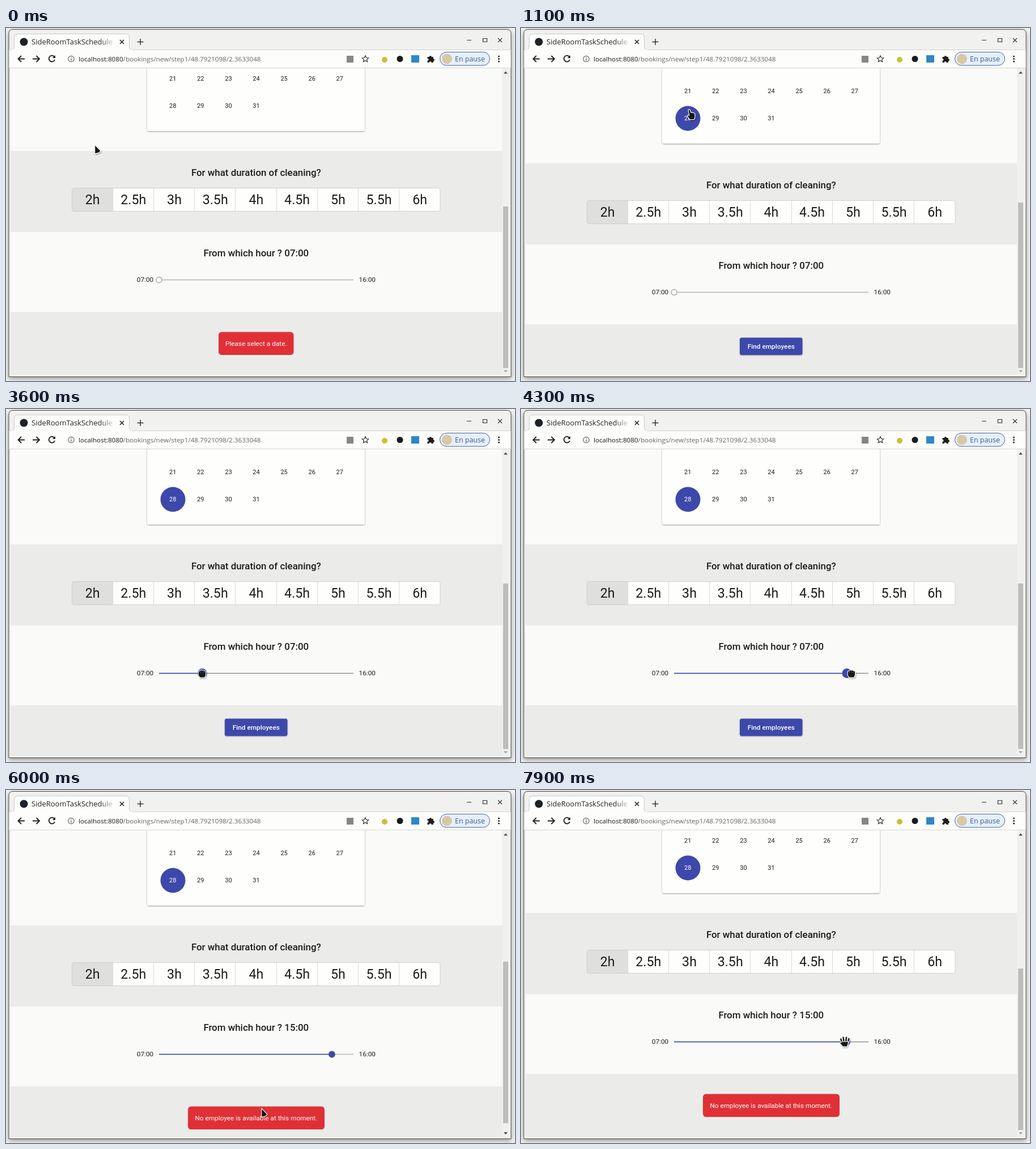
An HTML page that plays this animation: 898 px wide and 623 px high, repeating every 8 s.

```html
<!DOCTYPE html>
<html lang="en">
<head>
<meta charset="utf-8">
<title>Booking form</title>
<style>
  html, body { margin: 0; width: 100%; height: 100%; overflow: hidden; background: #f4f4f2; }
  svg { display: block; width: 898px; height: 623px; }
  text { font-family: Roboto, sans-serif; fill: #1c1c1c; }
  .ui { font-family: "Open Sans", "Noto Sans", sans-serif; }
  .line { fill: none; stroke: #333; stroke-width: 1.2; }
  .bold { fill: none; stroke: #222; stroke-width: 1.9; }
</style>
</head>
<body>
<svg id="stage" viewBox="0 0 898 623" xmlns="http://www.w3.org/2000/svg"></svg>
<script>
const LOOP = 8000, STEP = 100;
const BLUE = '#3d49aa', RED = '#e03036', GREY = '#ebece9', PAPER = '#fafbf8', CARD = '#fefffc';
const TRACK = { left: 270, right: 613, y: 444.5, hours: 9 };

const rect = (x, y, w, h, fill, extra = '') =>
  `<rect x="${x}" y="${y}" width="${w}" height="${h}" fill="${fill}" ${extra}/>`;
const circle = (x, y, r, fill, extra = '') =>
  `<circle cx="${x}" cy="${y}" r="${r}" fill="${fill}" ${extra}/>`;
const path = (d, extra = 'class="line"') => `<path d="${d}" ${extra}/>`;
// Text placed by the middle of its capitals.
const label = (str, x, mid, size, extra = '') =>
  `<text x="${x}" y="${mid + size * 0.356}" font-size="${size}" text-anchor="middle" ${extra}>${str}</text>`;
const uiText = (str, x, y, size, fill) =>
  `<text class="ui" x="${x}" y="${y}" font-size="${size}" style="fill:${fill}">${str}</text>`;
const group = (id, body) => `<g id="${id}">${body}</g>`;

function defs() {
  return `<defs>
    <clipPath id="page-clip"><rect x="8" y="71" width="867" height="541"/></clipPath>
    <linearGradient id="fade"><stop offset="0" stop-color="#fdfdfb" stop-opacity="0"/>
      <stop offset="1" stop-color="#fdfdfb"/></linearGradient>
    <filter id="window-shadow" x="-5%" y="-5%" width="110%" height="110%">
      <feDropShadow dx="0" dy="3" stdDeviation="4" flood-opacity=".4"/></filter>
    <filter id="card-shadow" x="-5%" y="-5%" width="110%" height="110%">
      <feDropShadow dx="0" dy="1" stdDeviation="1" flood-opacity=".4"/></filter>
    <filter id="cursor-shadow" x="-50%" y="-50%" width="200%" height="200%">
      <feDropShadow dx="1" dy="1.5" stdDeviation="1" flood-opacity=".35"/></filter>
  </defs>`;
}

function browser() {
  return [
    path('M5 615.5V10Q5 2.5 12 2.5H884Q891 2.5 891 10V615.5Z',
      'fill="#f1f2ef" stroke="#4c4c4a" filter="url(#window-shadow)"'),
    rect(5.5, 38, 885, 33, '#fdfdfb'),
    path('M5.5 38.5H890.5', 'stroke="#d2d3d0" fill="none"'),
    path('M8 39Q14.500 39 14.500 32V17Q14.500 10.500 21 10.500H211Q217.500 10.500 217.500 17V32Q217.500 39 224 39',
      'fill="#fdfdfb" stroke="#c9cac7"'),
    rect(9, 38, 214, 2, '#fdfdfb'),
    circle(31.500, 24.500, 7, '#1d2226'),
    uiText('SideRoomTaskSchedule', 45, 29, 13, '#222'),
    rect(166, 13, 27, 23, 'url(#fade)'), rect(192.500, 13, 8, 23, '#fdfdfb'),
    path('M201 21l7 7m0-7l-7 7', 'class="bold" style="stroke-width:1.6"'),
    path('M231.500 24.500h11m-5.500-5.500v11', 'class="line" style="stroke-width:1.5"'),
    path('M813 21.500h8M841.500 18.500h7v6h-7zM868 18l7 7m0-7l-7 7'),
    path('M33 54.500H21.500m5.500-5.500l-5.500 5.500 5.500 5.500M47 54.500h12m-5.500-5.500l5.500 5.500-5.500 5.500', 'class="bold"'),
    path('M85.500 51a5.400 5.400 0 1 0 .6 5', 'class="bold"'),
    path('M87 48v5h-5z', 'fill="#222"'),
    circle(115, 54.500, 5.200, 'none', 'stroke="#666" stroke-width="1.2"'),
    path('M115 53.800v4M115 51v1.500', 'stroke="#666" stroke-width="1.3"'),
    uiText('localhost:8080<tspan fill="#666">/bookings/new/step1/48.7921098/2.3633048</tspan>', 128, 58.500, 11.660, null),
    rect(601, 49, 12, 12, '#858785'),
    path('M634 48.800l1.700 3.700 4 .4-3 2.700.9 4-3.600-2.100-3.600 2.100.9-4-3-2.700 4-.4z'),
    circle(668, 56, 5, '#c6c13b'), circle(695, 54.500, 5.500, '#1a1a1a'), rect(715, 48, 14, 13, '#2f86c9'),
    path('M743.500 51h3.300a2 2 0 1 1 4 0h3v3.300a2.100 2.100 0 1 1 0 4.200v2.500h-3.200a2 2 0 0 0-4 0h-3.100v-3.300a2 2 0 0 0 0-4z', 'fill="#1d1d1d"'),
    rect(765.500, 42.500, 88, 23.500, '#e8eff9', 'rx="11.750" stroke="#3d629c"'),
    circle(778, 54.500, 9, '#d8c8a6'),
    uiText('En pause', 792, 59, 12.450, '#315f9f'),
    circle(869.500, 50, 1.500, '#222'), circle(869.500, 54.500, 1.500, '#222'), circle(869.500, 59, 1.500, '#222'),
    path('M5.500 70.500H890.500', 'stroke="#d5d6d3"'),
    rect(8, 71, 867, 541, PAPER),
    rect(875, 71, 12.500, 541, '#f0f1ee'),
    path('M878 80.500l3.500-4 3.500 4z', 'fill="#4c4c4a"'),
    path('M878 604l3.500 4 3.500-4z', 'id="down"'),
    rect(877, 0, 9, 0, '#bdbebb', 'id="bar"')
  ].join('');
}

function calendar() {
  let days = '';
  for (let day = 21; day <= 31; day++) {
    const i = day - 21;
    days += label(day, 294.200 + 49.100 * (i % 7), i < 7 ? 89 : 137, 11, day === 28 ? 'id="picked"' : '');
  }
  return rect(249, 20, 384, 162, CARD, 'rx="3.500" filter="url(#card-shadow)"') +
    circle(294.500, 137.500, 22, 'none', 'id="disc"') + days;
}

function durations() {
  const names = ['2', '2.5', '3', '3.5', '4', '4.5', '5', '5.5', '6'];
  const width = 72.200, left = 116.500;
  let out = rect(left, 282.500, 649.500, 41, CARD, 'rx="3.500"') +
    path('M120 282.500H188.700V323.500H120Q116.500 323.500 116.500 320V286Q116.500 282.500 120 282.500', 'fill="#dfe0dd"');
  names.forEach((name, i) => {
    if (i) out += path(`M${Math.round(left + width * i) - 0.5} 283V323`, 'stroke="#d9dad7"');
    out += label(name + 'h', left + width * (i + 0.5), 302.800, 23.200);
  });
  return out + rect(left, 282.500, 649.500, 41, 'none', 'rx="3.500" stroke="#cfd0cd"');
}

function slider() {
  const { left, right, y } = TRACK;
  return label('07:00', 245.500, 444, 11.830) + label('16:00', 637.300, 444, 11.830) +
    rect(left, y - 0.850, right - left, 1.700, '#000', 'id="rail"') +
    rect(left, y - 0.850, 0, 1.700, BLUE, 'id="fill"') + circle(left, y, 6, BLUE, 'id="thumb"');
}

const notice = (str, x, width) =>
  rect(x, 536.500, width, 40.500, RED, 'rx="5.500"') + label(str, 441.300, 557, 11.830, 'style="fill:#fff"');

function page() {
  return `<g clip-path="url(#page-clip)"><g id="page">` +
    calendar() +
    rect(8, 217, 867, 143, GREY) + rect(8, 501, 867, 170, GREY) +
    label('For what duration of cleaning?', 441.300, 254.800, 16.900, 'font-weight="500"') +
    durations() +
    label('', 441.300, 397.300, 16.900, 'font-weight="500" id="hour"') +
    slider() +
    group('ask', notice('Please select a date.', 375, 132.500)) +
    group('none', notice('No employee is available at this moment.', 321, 241)) +
    group('find', rect(386, 524.500, 110.500, 30.500, BLUE, 'rx="3.400" filter="url(#card-shadow)"') +
      label('Find employees', 441.300, 540, 11.830, 'font-weight="500" style="fill:#fff"')) +
    '</g></g>';
}

function cursors() {
  const ink = 'fill="#161616" stroke="#fff" stroke-width="1.100" stroke-linejoin="round"';
  const finger = (x, top, tilt) => rect(x, top, 3.400, 10, '#161616',
    `rx="1.700" stroke="#fff" stroke-width=".9" transform="rotate(${tilt} ${x + 1.700} 3)"`);
  return `<g id="cursor" filter="url(#cursor-shadow)">` +
    group('arrow', path('M-.3-.8L10 9.800Q8 14 -.3 14.800Z', ink)) +
    group('hand', path('M-3 .8Q-1.500-1.500 .3 .7L2.200 5.500Q5 4 6 6Q8.500 5.500 8.700 7.500L9 13 7.500 17.500H-.5L-4 12Q-5.500 9.500-2.800 9.500L-1.200 10.500Z', ink)) +
    group('open', finger(-6, -6.500, -18) + finger(-3, -9, -6) + finger(0.400, -9, 5) + finger(3.600, -7, 16) +
      path('M-5.500 0H6.500L6 5 4 9H-3L-8 3.500Q-9 1-6.500 1.500Z', ink)) +
    group('closed', path('M-6.500-3Q-5.500-6-3.500-5Q-2-7.500 0-5.800Q2.500-7 3.500-5Q6.500-5.500 6.700-2.500L6.500 3 4.500 7H-4L-7 2.500Z', ink) +
      path('M-3.300-4.500v4M0-5v4.500M3.400-4.500v4', 'stroke="#777" stroke-width=".6"')) +
    '</g>';
}

const stage = document.getElementById('stage');
stage.innerHTML = defs() + browser() + page() + cursors();
const $ = id => document.getElementById(id);
const set = (id, attrs) => Object.entries(attrs).forEach(([key, value]) => $(id).setAttribute(key, value));
const show = (id, on) => set(id, { display: on ? 'inline' : 'none' });

// time, x, y, pointer shape
const route = [
  [0, 157, 207, 'arrow'], [100, 185, 200, 'arrow'], [200, 185, 200, 'arrow'],
  [700, 284, 152, 'hand'], [800, 298, 144, 'hand'], [1300, 298, 144, 'hand'],
  [1600, 276, 195, 'arrow'], [2000, 212, 333, 'hand'], [2200, 207, 317, 'hand'], [2300, 207, 317, 'hand'],
  [2500, 225, 365, 'arrow'], [2700, 260, 452, 'arrow'], [2800, 272, 466, 'open'], [2900, 272, 466, 'open'],
  [3000, 273, 467, 'closed'], [3300, 273, 467, 'closed'], [3600, 346, 467, 'closed'],
  [3800, 537, 467, 'closed'], [4000, 537, 467, 'closed'], [4300, 583, 467, 'closed'], [4400, 583, 467, 'closed'],
  [4500, 578, 470, 'open'], [4600, 524, 506, 'arrow'], [4700, 524, 506, 'arrow'],
  [5000, 456, 556, 'hand'], [5100, 451, 565, 'hand'], [5500, 451, 565, 'hand'],
  [5600, 451, 562.500, 'arrow'], [7100, 451, 562.500, 'arrow'], [7600, 561, 464, 'arrow'],
  [7700, 570, 451, 'open'], [7800, 570, 451, 'open'], [7900, 571, 444, 'open']
];

const mix = (a, b, p) => a + (b - a) * p;
const clamp = (v, low, high) => Math.min(high, Math.max(low, v));

function pointerAt(t) {
  const i = route.findLastIndex(stop => stop[0] <= t);
  const from = route[i], to = route[i + 1] || from;
  const p = to === from ? 0 : (t - from[0]) / (to[0] - from[0]);
  return { x: mix(from[1], to[1], p), y: mix(from[2], to[2], p), shape: from[3] };
}

function hoursAt(t, x) {
  if (t < 3000) return 0;
  if (t >= 4500) return 8;
  const step = (TRACK.right - TRACK.left) / TRACK.hours;
  return clamp(Math.round((x - TRACK.left) / step), 0, TRACK.hours);
}

function scrollAt(t) {
  if (t < 1100 || t >= 6900) return 0;
  if (t < 6700) return 22;
  return t < 6800 ? 11 : 1;
}

function render(t) {
  const pointer = pointerAt(t), chosen = t >= 1100, failed = t >= 5600;
  const offset = scrollAt(t);
  set('page', { transform: `translate(0 ${offset})` });
  const top = failed ? 303 + 12 * (22 - offset) / 22 : chosen ? 308 : 315;
  set('bar', { y: top, height: chosen && !failed ? 292 : 285 });
  set('down', { fill: failed && t < 6900 ? '#4c4c4a' : '#a7a8a5' });

  set('disc', { fill: chosen ? BLUE : t >= 700 ? '#f1f2ef' : 'none' });
  $('picked').style.fill = chosen ? '#fff' : '';
  show('ask', !chosen);
  show('find', chosen && !failed);
  show('none', failed);

  const hours = hoursAt(t, pointer.x);
  const x = mix(TRACK.left, TRACK.right, hours / TRACK.hours);
  const blur = clamp((t - 5500) / 400, 0, 1);
  const focused = t >= 3000 ? 1 - blur : 0;
  const dark = t >= 7600 ? 1 : t >= 2700 ? 1 - blur : 0;
  const radius = mix(5.900, 8.450, focused);
  set('rail', { x: hours ? x : TRACK.left + radius, width: TRACK.right - x - (hours ? 0 : radius),
    'fill-opacity': mix(0.260, 0.380, dark) });
  set('fill', { width: x - TRACK.left });
  set('thumb', hours
    ? { cx: x, r: radius, fill: BLUE, stroke: 'none' }
    : { cx: x, r: radius - 0.850, fill: PAPER, stroke: dark ? '#9b9c99' : '#b7b8b5', 'stroke-width': 1.700 });
  $('hour').textContent = `From which hour ? ${t >= 4500 ? '15:00' : '07:00'}`;

  set('cursor', { transform: `translate(${pointer.x} ${pointer.y})` });
  ['arrow', 'hand', 'open', 'closed'].forEach(shape => show(shape, shape === pointer.shape));
}

const start = performance.now();
function tick() {
  const t = (performance.now() - start) % LOOP;
  render(Math.floor(t / STEP) * STEP);
  requestAnimationFrame(tick);
}
tick();
</script>
</body>
</html>
```
